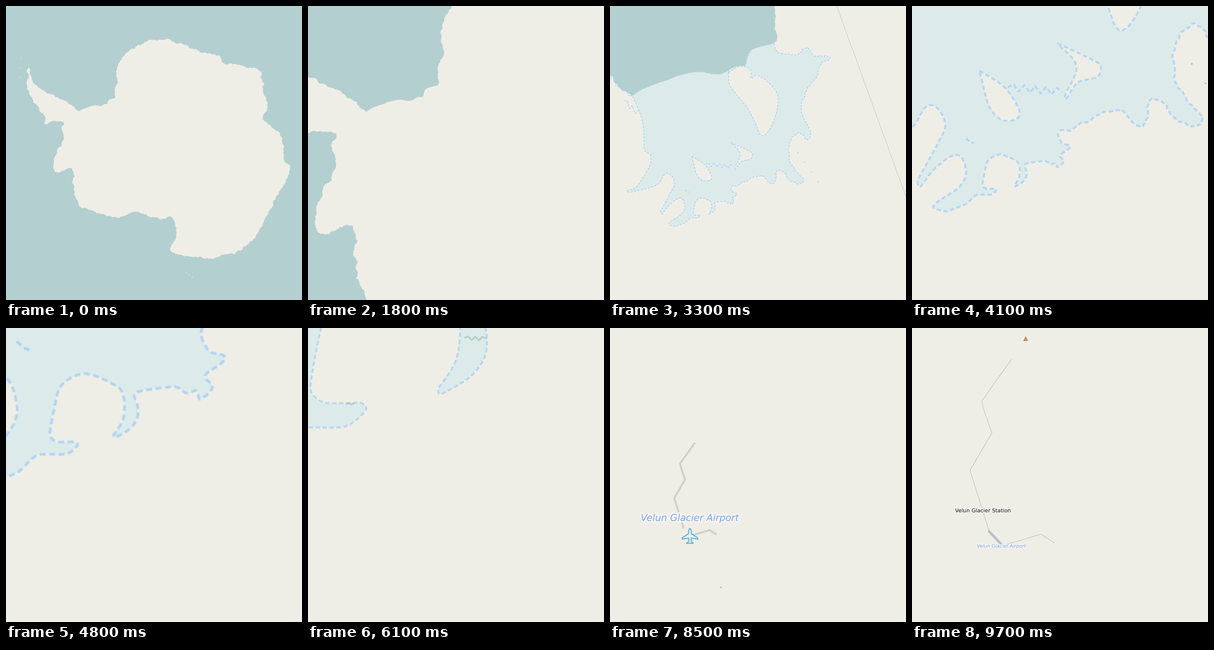
Write a matplotlib script that moves like this. It is 500 px wide and 496 px high and loops after 10000 ms.

```python
from itertools import count

import numpy as np
import matplotlib.pyplot as plt
from matplotlib.animation import FuncAnimation
from matplotlib.lines import Line2D
from matplotlib.patches import Polygon
from matplotlib.path import Path
from matplotlib.patheffects import withStroke

W, H = 500, 496
PT = 0.72  # points per pixel at 100 dpi
SEA, LAND, SHELF, DASH = "#b4cfd0", "#efeee6", "#dcebea", "#a3cdf7"
ROAD, HALO, LABEL, ICON = "#c3c0bb", "#f7f6f2", "#7aa3ea", "#55afd3"
AIRPORT, STATION = "Velun Glacier Airport", "Velun Glacier Station"

# Point under the pointer at each doubling of the zoom.
ANCHORS = [(148, 177), (160, 205), (162, 397), (164, 424),
           (144, 258), (130, 320), (125, 323), (119, 334)]
# Frame of the jump, first and last frame of tile loading.
JUMPS = [(18, 19, 22), (29, 30, 33), (41, 42, 43), (48, 49, 51),
         (61, 63, 65), (73, 74, 78), (85, 86, 88), (94, 95, 97)]
rng = np.random.default_rng(4)


def project(points, level):
    """World (level 0) to screen at a zoom level."""
    points = np.asarray(points, float)
    for anchor in ANCHORS[:level]:
        points = 2 * points - anchor
    return points


def at(level, *points):
    """Screen at a zoom level to world."""
    points = np.array(points, float)
    for anchor in ANCHORS[:level][::-1]:
        points = (points + anchor) / 2
    return points


def curve(points, steps=6):
    """Hermite curve through the points; short neighbours keep tangents short."""
    chord = np.diff(points, axis=0)
    length = np.hypot(*chord.T)
    along = np.vstack([chord[:1], points[2:] - points[:-2], chord[-1:]])
    reach = np.minimum(np.r_[length[0], length], np.r_[length, length[-1]])
    tangent = along * (reach / np.hypot(*along.T))[:, None]
    t = np.arange(steps)[:, None] / steps
    parts = [(1 + 2 * t) * (1 - t) ** 2 * p + t * (1 - t) ** 2 * m
             + t * t * (3 - 2 * t) * q + t * t * (t - 1) * n
             for p, q, m, n in zip(points, points[1:], tangent, tangent[1:])]
    return np.vstack(parts + [points[-1:]])


def roughen(points, amount, depth):
    """Fractal edge by random midpoint shifts."""
    for _ in range(depth):
        step = np.diff(points, axis=0)
        push = rng.uniform(-amount, amount, (len(step), 1))
        out = np.empty((2 * len(points) - 1, 2))
        out[::2] = points
        out[1::2] = points[:-1] + step / 2 + step[:, ::-1] * (-1, 1) * push
        points = out
    return points


def zigzag(level, start, end, teeth, height):
    points = np.linspace(start, end, teeth + 1)
    points[1::2, 1] -= height
    points[2:-1:2, 1] += height
    return at(level, *points)


def ring(level, *points):
    return curve(at(level, *points, points[0]))


front = roughen(curve(at(
    2, (38, 151), (58, 139), (118, 117), (150, 111), (185, 115), (212, 102), (228, 101),
    (238, 75), (277, 63)), 4), 0.06, 1)
shore = at(
    0, (183.5, 155), (184, 138), (189, 128), (186, 110), (196, 88), (213, 72), (246, 57),
    (297, 63), (328, 78), (360, 83), (367, 96), (403, 102), (432, 113), (441, 172),
    (434, 192), (466, 222), (470, 262), (480, 270), (473, 296), (457, 320), (438, 358),
    (427, 380), (416, 396), (390, 414), (337, 426), (285, 417), (277, 410), (287, 388),
    (284, 362), (277, 355), (262, 360), (218, 347), (200, 354), (180, 357), (150, 347),
    (123, 335), (113, 300), (112, 274), (92, 281), (82, 279), (80, 266), (86, 246),
    (98, 222), (93, 206), (98, 196), (78, 194), (66, 200), (66, 187), (50, 165),
    (36, 140), (38, 103), (42, 118), (48, 133), (75, 149), (105, 163), (123, 178))
coast = np.vstack([front, roughen(curve(shore, 3), 0.2, 3)])

shelf_edge = np.vstack([
    roughen(curve(at(
        2, (277, 63), (284, 79), (317, 82), (332, 70), (344, 84), (372, 86), (355, 99),
        (350, 118), (334, 137), (322, 172), (338, 210), (334, 226), (319, 213),
        (303, 235), (306, 268), (327, 293), (318, 300), (303, 293), (284, 276),
        (276, 300), (255, 286), (225, 296)), 3), 0.2, 2),
    curve(at(
        4, (372, -3), (332, 0), (342, 38), (370, 51), (336, 80), (349, 100), (328, 120),
        (322, 106), (305, 110), (285, 99), (219, 109), (223, 134), (221, 154), (208, 171),
        (184, 185), (182, 180), (197, 156), (200, 125), (190, 100), (135, 77), (95, 95),
        (83, 129), (74, 180), (86, 192), (116, 192), (121, 198), (104, 212), (73, 213),
        (50, 216), (22, 242), (5, 250))),
    curve(at(
        2, (110, 372), (99, 367), (120, 352), (126.7, 339), (119, 324), (100, 336),
        (88, 351), (86, 345), (103, 314), (109, 297), (96, 282), (82, 300), (65, 307),
        (35, 314), (28, 312), (45, 305), (66, 272), (69, 253), (58, 243), (55, 195),
        (38, 151)))])
holes = [
    ring(2, (200, 112), (220, 101), (238, 108), (238, 122), (246, 117), (262, 124),
         (283, 150), (279, 187), (259, 219), (246, 198), (232, 172), (203, 135)),
    ring(2, (138, 253), (160, 268), (172, 290), (158, 295), (146, 283)),
    ring(2, (204, 230), (239, 247), (238, 258), (221, 263), (210, 276), (220, 250))]
creeks = [zigzag(2, (162, 267), (208, 271), 10, 3), zigzag(2, (0, 121), (37, 151), 7, 5),
          zigzag(2, (24, 160), (47, 181), 5, 5), zigzag(4, (18, 23), (45, 39), 2, -3)]
cliffs = [zigzag(5, (264, 17), (301, 18), 6, 3), zigzag(5, (64, 128), (78, 128), 3, 1)]
specks = np.vstack([np.linspace((25, 88), (23, 120), 3),
                    np.linspace((304, 449), (314, 457), 3)])
ponds = at(2, *np.linspace((317, 247), (351, 296), 4))
border = at(2, (383, 0), (500, 322))
track = at(8, (168, 53), (118, 123), (120, 135), (135, 177), (98, 240), (130, 342))
spur = at(8, (153, 367), (218, 348), (241, 363))
runway = at(8, (129, 342), (152, 366))
airport, hut = at(7, (135, 351), (187, 437))

half_plane = np.array([(0, -6.6), (1.1, -5), (1.2, -2), (6.6, 1.6), (6.6, 2.6),
                       (1.2, 1.7), (1, 4.4), (3, 6.2), (0, 6.2)])
plane = np.vstack([half_plane, half_plane[::-1] * (-1, 1)])

fig = plt.figure(figsize=(W / 100, H / 100), dpi=100, facecolor=LAND)
ax = fig.add_axes([0, 0, 1, 1])
ax.set(xlim=(0, W), ylim=(H, 0))
ax.axis("off")
order = count(1)


def box(x0, y0, x1, y1):
    return Path([(x0, y0), (x1, y0), (x1, y1), (x0, y1), (x0, y0)], closed=True)


def build(level, view):
    """All artists of one zoom level, enlarged to the scale of the view."""
    scale = 2 ** (view - level)
    # Enlarged tiles are soft: strokes get a paler core and a wide faint rim.
    strokes = [(1.9, 0.3), (1.1, 0.65)] if scale > 1 else [(1, 1)]
    group = []

    def add(artist):
        artist.set(zorder=next(order), visible=False)
        ax.add_artist(artist)
        group.append(artist)

    def fill(points, color, **style):
        add(Polygon(points, facecolor=color, **style))

    def line(points, color, width, dash=None):
        x, y = project(points, view).T
        for widen, alpha in strokes:
            full = width * scale * widen
            style = (0, [d * scale / full for d in dash]) if dash else "-"
            add(Line2D(x, y, color=color, lw=full * PT, alpha=alpha, ls=style,
                       dash_capstyle="butt", solid_capstyle="butt"))

    def dashed(points):
        big = level == 3
        line(points, DASH, 1.6 if big else 1.1, (5, 3) if big else (3.6, 2.3))

    def dot(point, color, size):
        x, y = project(point, view)
        add(Line2D([x], [y], marker="o", ms=size * scale * PT, mfc=color, mec="none"))

    def label(x, y, text, size, color, style="normal"):
        add(plt.Text(x, y, text, fontsize=size * scale * PT, color=color, style=style,
                     family="DejaVu Sans", ha="center", va="center", clip_on=True,
                     path_effects=[withStroke(linewidth=2.4 * scale * PT,
                                              foreground=HALO)]))

    fill(box(0, 0, W, H).vertices, SEA if level <= 2 else LAND)
    if level <= 2:
        fill(project(coast, view), LAND)
        for speck in specks:
            dot(speck, LAND, 1.5)
    if 2 <= level <= 6:
        fill(project(np.vstack([front, shelf_edge]), view), SHELF)
        for hole in holes:
            fill(project(hole, view), LAND)
        for edge in [shelf_edge, *holes, *creeks]:
            dashed(edge)
        for pond in ponds:
            dot(pond, DASH, 1.8)
    if level == 2:
        line(front, DASH, 0.6, (3, 2))
        line(border, "#cfccd0", 1)
    if level in (4, 5):
        for cliff in cliffs:
            line(cliff, "#a9c2b8", 0.9)
    if level >= 6:
        line(track, ROAD, 1)
        line(spur, ROAD, 1)
    if level in (6, 7):
        x, y = project(airport, view)
        dot(hut, "#c6c4cc", 1.8)
        fill(plane * scale + (x, y), "#e3f0f2", edgecolor=ICON, lw=0.8 * scale * PT)
        label(x, y - 15 * scale, AIRPORT, 8, LABEL, "italic")
    if level == 8:
        line(runway, "#b3bfc9", 4)
        label(151, 368, AIRPORT, 8, LABEL, "italic")
        label(120.5, 308.5, STATION, 9, "#111111")
        fill([(192, 14.5), (195.5, 21.5), (188.5, 21.5)], "#d08f50",
             edgecolor="#b98a5c", lw=0.6)
    return group


enlarged, sharp = {}, {0: build(0, 0)}
for view in range(1, len(ANCHORS) + 1):
    enlarged[view] = build(view - 1, view)
    sharp[view] = build(view, view)
artists = [a for groups in (enlarged, sharp) for group in groups.values() for a in group]

tiles = [box(x, y, x + 256, y + 256) for x in (-206, 50, 306) for y in (-136, 120, 376)]
tiles.sort(key=lambda t: np.hypot(*(t.vertices[:4].mean(axis=0) - (W / 2, H / 2))))


def show(group, clip):
    for artist in group:
        artist.set_visible(True)
        artist.set_clip_path(clip, ax.transData)


def update(frame):
    for artist in artists:
        artist.set_visible(False)
    view = sum(frame >= jump[0] for jump in JUMPS)
    loaded = len(tiles)
    if view:
        _, first, last = JUMPS[view - 1]
        part = np.clip((frame - first + 1) / (last - first + 1), 0, 1)
        loaded = int(round(part * len(tiles)))
    if loaded < len(tiles):
        show(enlarged[view], box(0, 0, W, H))
    if loaded:
        show(sharp[view], Path.make_compound_path(*tiles[:loaded]))
    return artists


anim = FuncAnimation(fig, update, frames=100, interval=100, repeat=True,
                     repeat_delay=0, blit=False)
plt.show()
```
